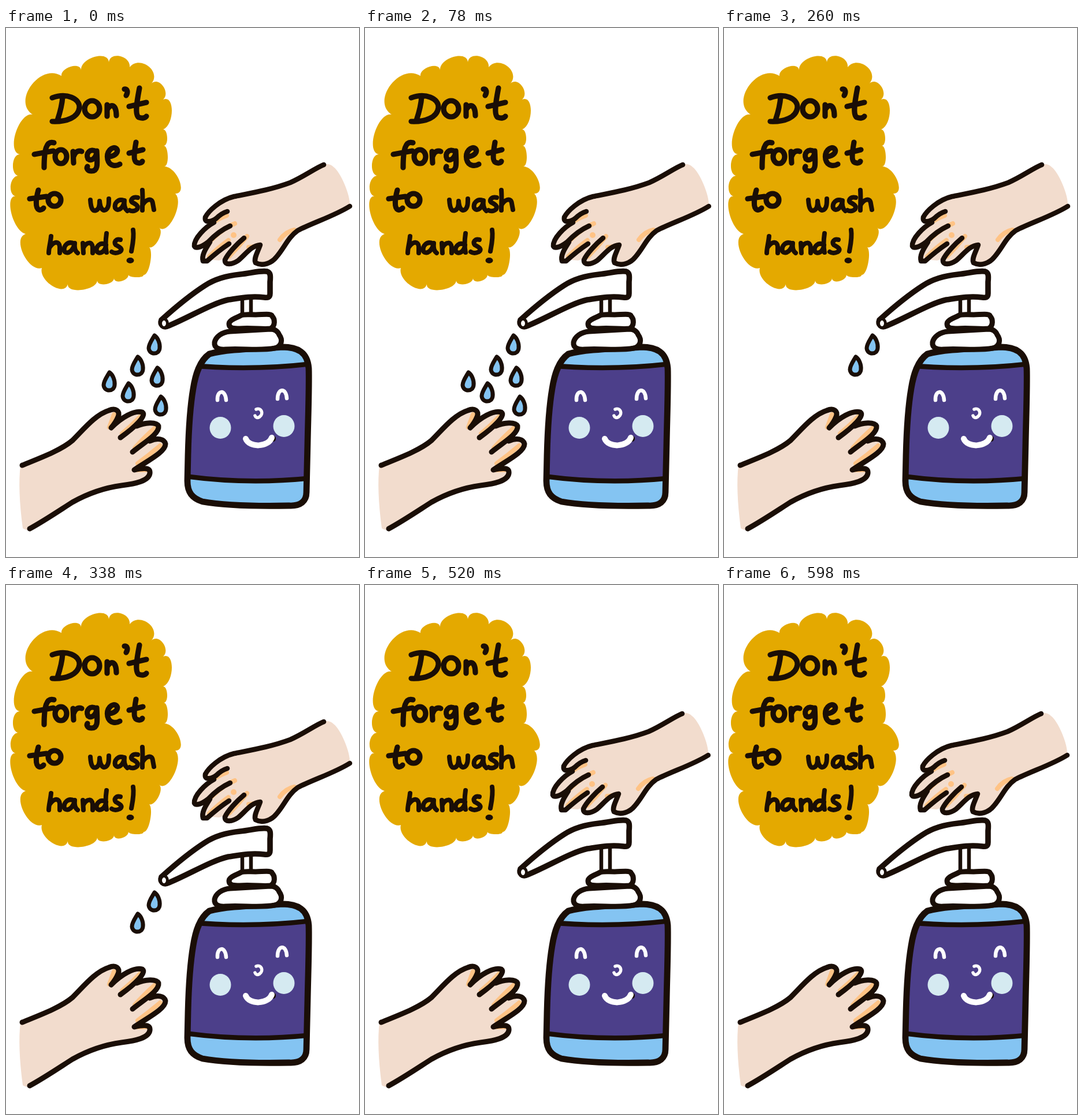
An HTML page with a canvas that plays this animation: 611 by 917 pixels, repeating every 650 ms.

```html
<!DOCTYPE html>
<html lang="en">
<head>
<meta charset="utf-8">
<title>Wash hands</title>
<style>
html, body { margin: 0; width: 100%; height: 100%; overflow: hidden; background: #fff; }
canvas { display: block; }
</style>
</head>
<body>
<canvas id="stage" width="611" height="917" role="img" aria-label="Don't forget to wash hands!"></canvas>
<script>
const ctx = document.getElementById('stage').getContext('2d');
const STEP = 130;
const DROPS_SHOWN = [6, 3, 2, 1, 0];
const INK = '#1a0e06', SKIN = '#f2dccd', SHADE = '#ffc385', BLUE = '#84c4f2';
const PURPLE = '#4c3f8a', CHEEK = '#d5eaf1', GOLD = '#e4a900';

function shape(d, fill, line, width = 9) {
  const path = new Path2D(d);
  if (fill) { ctx.fillStyle = fill; ctx.fill(path); }
  if (line) { ctx.strokeStyle = line; ctx.lineWidth = width; ctx.stroke(path); }
}

function oval(x, y, rx, ry, fill, line, width) {
  const path = new Path2D();
  path.ellipse(x, y, rx, ry, 0, 0, Math.PI * 2);
  shape(path, fill, line, width);
}

function at(x, y, draw) {
  ctx.save();
  ctx.translate(x, y);
  draw();
  ctx.restore();
}

// Each bump: its outermost point, then the valley where it ends.
const bumps = [
  [44, 99, 96, 83], [112, 67, 130, 73], [153, 50, 178, 59], [198, 49, 214, 68],
  [246, 66, 252, 96], [272, 101, 272, 124], [287, 143, 272, 176], [279, 190, 273, 204],
  [280, 222, 274, 240], [300, 264, 293, 287], [291, 328, 265, 346], [263, 369, 246, 379],
  [250, 405, 238, 428], [226, 432, 212, 428], [199, 439, 187, 433], [173, 444, 158, 438],
  [131, 454, 107, 444], [80, 447, 62, 416], [30, 392, 34, 357], [9, 320, 19, 292],
  [8, 274, 22, 256], [12, 237, 24, 219], [17, 181, 46, 150]
];

function bumpyPath() {
  let [x, y] = bumps[bumps.length - 1].slice(2);
  const path = new Path2D();
  path.moveTo(x, y);
  for (const [px, py, ex, ey] of bumps) {
    const dx = (px - (x + ex) / 2) * 4 / 3, dy = (py - (y + ey) / 2) * 4 / 3;
    path.bezierCurveTo(x + dx, y + dy, ex + dx, ey + dy, ex, ey);
    [x, y] = [ex, ey];
  }
  return path;
}
const bubblePath = bumpyPath();

const lettering = [
  // Don't
  'M98 119C97 135 93 148 89 160M80 121C105 112 128 122 127 138C125 155 105 163 80 162' +
  'M136 140a13 14 0 1 0 26 0a13 14 0 1 0-26 0M175 133V153M175 142C181 130 191 132 191 152' +
  'M205 106C211 105 211 112 208 117M231 104C227 125 222 150 230 155C236 157 241 156 243 153M213 136L243 129',
  // forget
  'M83 199C70 195 66 210 66 242M49 219L82 213M85 223a10 12 0 1 0 20 0a10 12 0 1 0-20 0' +
  'M116 214L117 234M117 223C120 213 127 212 131 214' +
  'M156 214C146 208 137 217 142 227C148 232 157 225 157 213C158 235 160 248 148 248C141 248 139 243 141 240' +
  'M178 223C190 222 196 214 191 209C184 204 173 214 176 228C179 240 191 240 197 236' +
  'M225 198C222 215 220 230 226 233C231 235 235 234 236 231M213 217L237 211',
  // to
  'M56 281C52 295 50 312 57 315C60 316 64 314 65 312M41 296L70 292M73 298a11 11 0 1 0 22 0a11 11 0 1 0-22 0'
];
const lightLettering = [
  // wash
  'M146 298C147 315 151 318 156 316C161 314 162 306 162 300C163 312 167 318 173 315C178 311 178 304 178 296' +
  'M204 299C194 295 187 304 189 312C194 320 204 311 205 299C204 307 206 314 210 317' +
  'M228 294C220 292 214 298 218 302C225 306 230 308 227 314C223 318 217 318 214 316' +
  'M236 281C237 295 236 305 236 316M236 308C241 297 253 293 254 304L256 315',
  // hands!
  'M78 361C77 372 74 382 74 390M75 381C83 369 92 369 93 379V390' +
  'M118 374C107 368 99 378 101 387C107 394 117 385 119 373C118 381 120 387 124 390' +
  'M133 373L134 390M134 381C140 370 149 370 150 380V390' +
  'M173 376C163 370 155 379 157 387C162 394 172 387 173 377M174 356C172 370 172 380 174 389' +
  'M198 367C190 365 186 372 190 376C198 380 203 384 197 388C191 391 186 390 183 388' +
  'M220 350C222 363 219 376 217 387'
];

function drawBubble(tilted) {
  ctx.save();
  if (tilted) ctx.transform(1.012, -0.167, 0.199, 1.012, -41.5, 7.3);
  shape(bubblePath, GOLD);
  lettering.forEach(d => shape(d, null, INK, 9.2));
  lightLettering.forEach(d => shape(d, null, INK, 8));
  oval(215, 403, 6.5, 5, INK);
  ctx.restore();
}

function drawBottle() {
  const body = 'M352 565C335 577 328 600 324 625C318 660 316 700 315 740L314 785C314 805 322 815 340 821' +
    'C380 828 440 829 490 828C510 829 520 820 520 805L522 720C523 670 525 620 524 590C522 562 505 553 478 553C440 556 385 556 352 565Z';
  shape(body, BLUE);
  ctx.save();
  ctx.clip(new Path2D(body));
  shape('M310 584Q420 595 530 582V780Q420 792 310 777Z', PURPLE, INK, 8.5);
  ctx.restore();
  shape(body, null, INK, 10.8);

  shape('M366 645C365 627 380 626 381 645M470 643C470 624 485 623 486 642', null, '#fff', 6.5);
  shape('M433 661C441 657 447 668 439 674C435 677 432 675 431 672', null, '#fff', 5.5);
  oval(463, 712, 4, 5, INK);
  shape('M415 712C421 728 454 727 460 710', null, '#fff', 10);
  oval(371, 693, 18.5, 19, CHEEK);
  oval(481, 690, 18.5, 19, CHEEK);
}

function drawCap(lift) {
  shape(`M409 ${465 - lift}V500H424V${465 - lift}`, '#fff', INK, 6.5);
  shape('M388 526C374 527 363 535 361 545C360 554 368 558 380 557C410 555 440 560 465 555' +
    'C478 552 479 540 473 532C470 525 465 522 458 522Z', '#fff', INK);
  shape('M407 498C398 503 386 506 386 513C386 521 395 521 405 521C425 519 445 523 458 521' +
    'C467 516 465 504 461 500C460 494 445 497 432 497C420 497 412 496 407 498Z', '#fff', INK);
}

function drawPump() {
  shape('M269 506C290 487 320 462 345 446C365 433 385 429 405 427C425 425 440 420 452 422' +
    'C458 424 458 430 457 440V460C457 467 453 468 447 467C425 464 405 468 385 471' +
    'C355 478 320 500 282 516C272 521 266 514 269 506Z', '#fff', INK, 9.6);
  oval(273.5, 512, 6, 7.5, '#fff', INK, 5);
}

function drawUpperHand() {
  const upperEdge = 'M550 237C535 243 515 258 492 268C460 280 425 286 395 292C370 298 350 318 345 328C343 339 356 336 364 330';
  shape(upperEdge + 'C345 345 325 365 326 378C329 384 342 378 353 371C346 382 338 394 341 404L357 402L369 403L378 400' +
    'C378 412 392 410 402 403C415 392 425 377 440 376C436 388 428 400 432 407' +
    'C445 414 460 407 468 397C482 381 488 363 505 351C530 338 570 325 595 309C597 290 578 248 567 241Q560 234 550 237Z', SKIN);
  shape('M382 325Q366 331 356 339M396 339C380 345 367 356 355 368M385 368Q368 380 352 396' +
    'M417 361Q402 380 386 396M440 376Q428 380 420 380M499 350Q484 353 474 367', null, SHADE, 8);
  oval(394, 359, 5, 5, SHADE);
  shape(upperEdge + 'Q373 321 383 318' +
    'M360 337C345 345 325 365 326 378C329 384 341 378 350 371Q368 352 388 343' +
    'M353 371C346 382 338 394 341 404L348 404Q368 386 386 374' +
    'M412 364C400 374 384 391 379 402C378 412 392 410 402 403C415 392 425 377 440 376' +
    'C436 388 428 400 432 407C445 414 460 407 468 397C482 381 488 363 505 351C530 338 570 325 595 309', null, INK, 8.6);
}

function drawLowerHand() {
  shape('M25 758C60 745 95 732 115 715C135 695 155 670 178 663C190 658 198 664 194 674L186 692' +
    'C200 675 222 662 236 666C244 672 234 680 226 690C240 684 260 682 264 690C266 702 258 709 250 716' +
    'C262 710 274 712 276 721C276 735 245 750 225 766C240 762 250 762 249 772C247 785 225 790 200 793' +
    'C170 797 140 808 115 822C90 838 65 855 40 870Q32 870 29 867Q20 800 25 758Z', SKIN);
  shape('M187 670L179 692M232 674Q217 690 201 703M257 694Q240 709 223 728M267 724Q248 740 228 755M242 766L225 766', null, SHADE, 8);
  shape('M28 758C60 745 95 732 115 715C135 695 155 670 178 663C190 658 198 664 194 674Q190 684 182 693' +
    'C200 675 222 662 236 666C244 672 223 692 198 710' +
    'M226 690C240 684 260 682 264 690C266 703 240 718 219 735' +
    'M249 716C262 710 274 712 276 721C276 735 245 750 222 766' +
    'C240 762 250 762 249 772C247 785 225 790 200 793C170 797 140 808 115 822C90 838 65 855 41 868', null, INK);
}

// Tip of every drop, in the order they stay visible.
const drops = [[257, 533], [228, 570], [262, 589], [179, 597], [212, 616], [268, 639]];

function drawDrop([x, y]) {
  at(x, y, () => shape('M0 0C-4 7-10 15-10 22C-9 34 8 34 9 22C10 14 6 4 0 0Z', BLUE, INK, 7));
}

function render(step) {
  const lift = step === 4 ? 14 : 0;
  ctx.fillStyle = '#fff';
  ctx.fillRect(0, 0, 611, 917);
  drawBubble(step % 2 === 1);
  drawBottle();
  drawCap(lift);
  at(0, -lift, drawPump);
  at(lift ? -1 : 0, -lift, drawUpperHand);
  drawLowerHand();
  drops.slice(0, DROPS_SHOWN[step]).forEach(drawDrop);
}

ctx.lineCap = ctx.lineJoin = 'round';
const start = performance.now();
function tick() {
  const elapsed = Math.max(0, performance.now() - start);
  render(Math.floor(elapsed / STEP) % DROPS_SHOWN.length);
  requestAnimationFrame(tick);
}
tick();
</script>
</body>
</html>
```
